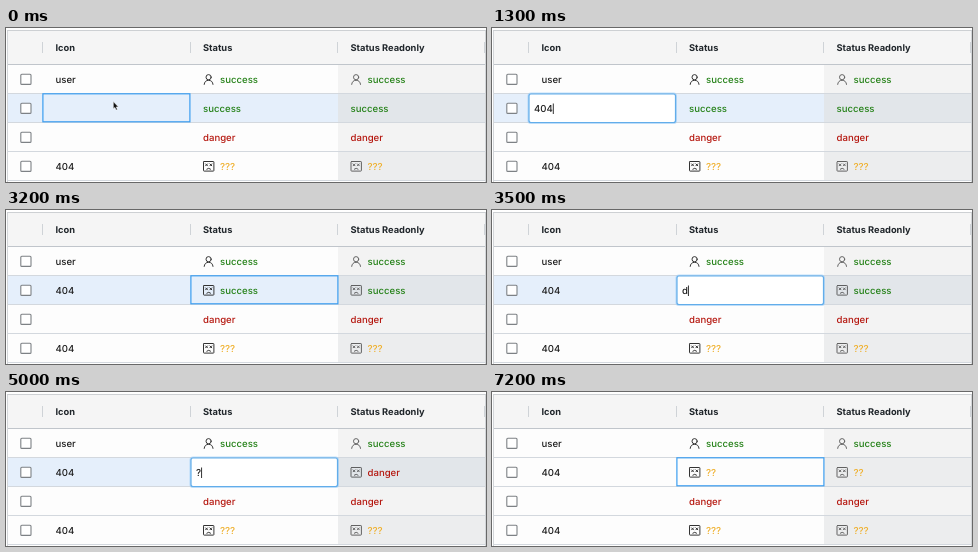
These frames come from a looping animation (480 px wide and 154 px high, 7.3 s). An HTML page:

```html
<!DOCTYPE html>
<html lang="en">
<head>
<meta charset="utf-8">
<title>Editable grid</title>
<style>
  html, body { margin: 0; width: 100%; height: 100%; overflow: hidden; background: #fff; }
  svg { display: block; width: 480px; height: 154px; font: 500 9.6px Inter, sans-serif; text-rendering: geometricPrecision; }
  text { fill: #1c1c1c; white-space: pre; }
  .head { font-size: 9.3px; font-weight: 700; fill: #20262b; }
  .success { fill: #238016; }
  .danger { fill: #b5170f; }
  .unknown { fill: #efb02d; }
  .line { stroke: #d3d8de; }
  .icon { fill: none; stroke: #333; stroke-width: 1; stroke-linecap: round; }
  .muted { opacity: .75; }
  .box { fill: #fff; stroke: #7d8185; stroke-width: 1.1; }
  .focus { fill: none; stroke: #3b9df0; stroke-width: 1.2; }
  .glow { fill: none; stroke: #9ccdf8; stroke-width: 3; opacity: .65; }
  .edit { fill: #fff; stroke: #62adea; stroke-width: 1.2; }
</style>
</head>
<body>
<svg viewBox="0 0 480 154">
  <defs>
    <g id="user" class="icon">
      <circle cx="5.6" cy="-2.3" r="2.6"/>
      <path d="M1.2 4.9C1.4 2.4 3 .8 5.6.8S9.8 2.4 10 4.9"/>
    </g>
    <g id="face" class="icon">
      <rect x=".5" y="-5" width="10.4" height="9.6" rx=".6"/>
      <path d="M2.6-2.6l1.9 1.9m0-1.9L2.6-.7M6.9-2.6l1.9 1.9m0-1.9L6.9-.7M3.8 2.6Q5.7.8 7.6 2.6"/>
    </g>
  </defs>
  <g id="grid"></g>
  <g id="live"></g>
</svg>
<script>
const LOOP = 7300;
const COLS = { icon: 36.5, status: 184.5, readonly: 331.5 };
const rowY = i => 51.5 + i * 29;

// Each step overrides parts of the state before it.
const steps = [
  { at: 0, col: 'icon', typed: null, icon: '', value: 'success', active: true, mouse: 'arrow' },
  { at: 800, typed: '4' },
  { at: 900, mouse: 'beam' },
  { at: 1000, typed: '40', mouse: '' },
  { at: 1200, typed: '404' },
  { at: 1900, typed: null, icon: '404' },
  { at: 2100, col: 'status' },
  ...[...'danger'].map((_, i) => ({ at: 3500 + i * 100, typed: 'danger'.slice(0, i + 1) })),
  { at: 4200, typed: null, value: 'danger' },
  { at: 5000, typed: '?' },
  { at: 5200, typed: '??' },
  { at: 5400, typed: null, value: '??' },
  { at: 6400, active: false }
];

const rect = (x, y, w, h, fill) =>
  `<rect x="${x}" y="${y}" width="${w}" height="${h}" fill="${fill}"/>`;
const frame = (x, y, w, h, cls, r = 0) =>
  `<rect class="${cls}" x="${x}" y="${y}" width="${w}" height="${h}" rx="${r}"/>`;
const label = (x, y, s, cls = '') => `<text class="${cls}" x="${x}" y="${y + 3.5}">${s}</text>`;
const rule = (x1, y1, x2, y2, color) =>
  `<path d="M${x1} ${y1}L${x2} ${y2}" stroke="${color}"/>`;

function status(x, y, icon, value, cls = '') {
  const kind = value.startsWith('?') ? 'unknown' : value;
  const mark = icon === 'user' ? 'user' : icon ? 'face' : '';
  return (mark ? `<use class="${cls}" href="#${mark}" x="${x}" y="${y}"/>` : '') +
    label(x + (mark ? 17 : 0), y, value, kind);
}

function row(i, icon, value, bg, shade) {
  const y = rowY(i), top = y - 14.5;
  return rect(2, top, 477, 29, bg) + rect(332, top, 147, 29, shade) +
    frame(14.8, y - 5.3, 10.2, 10.2, 'box', 1) + label(49.5, y, icon) +
    status(197, y, icon, value) + status(344.5, y, icon, value, 'muted') +
    `<path class="line" d="M2 ${top + 28.5}H479"/>`;
}

function header() {
  const sep = x => rule(x, 14, x, 25, '#cfd3d7');
  return rect(1, 2, 478, 35, '#f5f5f5') +
    label(49.5, 19.5, 'Icon', 'head') + label(197, 19.5, 'Status', 'head') +
    label(344.5, 19.5, 'Status Readonly', 'head') +
    [...Object.values(COLS), 478.5].map(sep).join('') +
    rule(1, 36.5, 479, 36.5, '#c0c5cb');
}

const pointers = {
  arrow: '<path d="M107.3 73.6v7.2l1.6-1.4 1.2 2.7 1.3-.6-1.2-2.6h2.2z" fill="#111" stroke="#fff" stroke-width=".5"/>',
  beam: '<path d="M105.3 70q1.7 0 1.7 1.2 0-1.2 1.7-1.2M107 71v5.2M105.3 77.3q1.7 0 1.7-1.2 0 1.2 1.7 1.2" fill="none" stroke="#444" stroke-width=".8"/>'
};

function live(s) {
  const x = COLS[s.col], y = rowY(1), top = 66;
  let out = s.active
    ? row(1, s.icon, s.value, '#e5effb', '#e2e6ea')
    : row(1, s.icon, s.value, '#fdfdfd', '#ecedee');
  if (s.typed === null) {
    out += frame(x + .4, top - .2, 147, 28, 'focus');
  } else {
    out += frame(x + .5, top, 146.5, 28.5, 'glow', 2) + frame(x + .5, top, 146.5, 28.5, 'edit', 2) +
      `<text id="input" x="${x + 5.5}" y="${y + 3.5}">${s.typed}</text>`;
  }
  return out + (pointers[s.mouse] || '');
}

function caret(text) {
  const x = +text.getAttribute('x') + text.getComputedTextLength() + .5;
  return rule(x, 75.5, x, 86, '#333');
}

const grid = document.getElementById('grid');
const layer = document.getElementById('live');
grid.innerHTML = header() +
  row(0, 'user', 'success', '#fdfdfd', '#f3f3f3') +
  row(2, '', 'danger', '#fdfdfd', '#f3f3f3') +
  row(3, '404', '???', '#fdfdfd', '#ecedee') +
  rule(1.5, 2, 1.5, 154, '#d3d6d9') + rule(479.5, 2, 479.5, 154, '#d3d6d9') +
  rule(1, 2.5, 480, 2.5, '#cdd0d3');

let shown = -1;
function draw(t) {
  const n = steps.filter(s => s.at <= t).length;
  if (n === shown) return;
  shown = n;
  layer.innerHTML = live(Object.assign({}, ...steps.slice(0, n)));
  const text = layer.querySelector('#input');
  if (text) layer.insertAdjacentHTML('beforeend', caret(text));
}

const start = performance.now();
function tick() {
  draw((performance.now() - start) % LOOP);
  requestAnimationFrame(tick);
}
tick();
</script>
</body>
</html>
```
